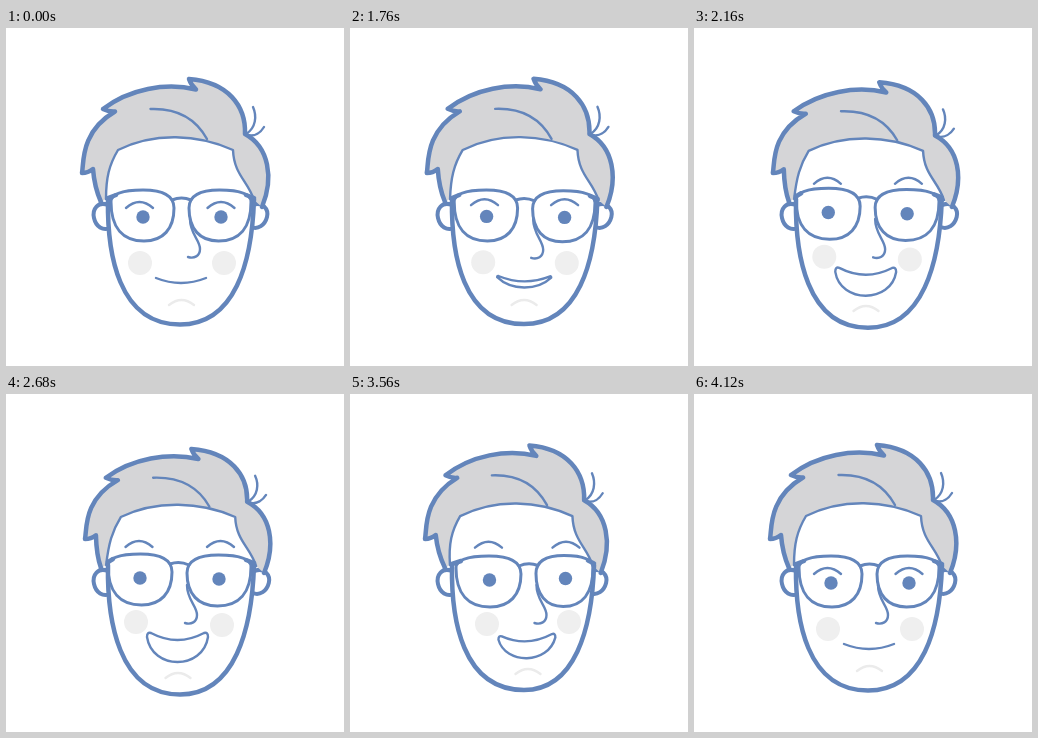
Animation of 338 by 338 pixels, one loop 5320 ms. Source, as an HTML page:

```html
<!DOCTYPE html>
<html lang="en">
<head>
<meta charset="utf-8">
<title>Smiling face</title>
<style>
  html, body { margin: 0; width: 100%; height: 100%; overflow: hidden; background: #fff; }
  svg { display: block; width: 100%; height: 100%; }
  path { fill: none; stroke: #6385bb; stroke-width: 2.4; stroke-linecap: round; stroke-linejoin: round; }
  .bold { stroke-width: 4.5; }
  .ear { stroke-width: 4; fill: #fff; }
  .skin { stroke: none; fill: #fff; }
  .mass { stroke: none; fill: #d5d5d7; }
  .soft { stroke: #ebebeb; }
  .lens { stroke-width: 3; }
  .temple { stroke-width: 4.5; }
  .eye { fill: #6385bb; }
  .cheek { fill: #efefef; }
</style>
</head>
<body>
<svg viewBox="0 0 338 338">
  <path id="earL" class="ear"/><path id="earR" class="ear"/>
  <path id="skin" class="skin"/>
  <circle id="cheekL" class="cheek" r="12"/><circle id="cheekR" class="cheek" r="12"/>
  <path id="mass" class="mass"/>
  <path id="jaw" class="bold"/>
  <path id="fringe"/><path id="swoop"/>
  <path id="crown" class="bold"/>
  <path id="tuft"/>
  <path id="chin" class="soft"/>
  <path id="browL"/><path id="browR"/>
  <circle id="eyeL" class="eye" r="6.7"/><circle id="eyeR" class="eye" r="6.7"/>
  <path id="nose"/><path id="mouth"/>
  <path id="lensL" class="lens"/><path id="lensR" class="lens"/>
  <path id="bridge" class="lens"/><path id="temples" class="temple"/>
</svg>
<script>
const LOOP = 5320, STEP = 40;

// hair: left, right, top; face: right, chin; lens: left, right, top
// brow: left x, right x, top; mouth: left xy, right xy, lip, bottom
const calm = {
  hair: [76, 264, 51], face: [247, 296.5], lensL: [105, 168, 162], lensR: [183, 245, 162],
  eyes: [137, 189, 215, 189], brow: [133.5, 215, 174], nose: [0, 0],
  mouth: [150, 250, 200, 250, 255, 255], cheeks: [134, 235, 218, 235], chin: [175.5, 272]
};
const rise = {
  hair: [78, 265, 50.5], face: [245.5, 295.5], lensL: [103, 167, 162], lensR: [182, 245, 164],
  eyes: [136, 187.5, 214, 190], brow: [136, 214, 167], nose: [-2, 2],
  mouth: [143, 245, 203, 246, 251, 266], cheeks: [132, 233, 215, 235], chin: [172, 272]
};
const grin = {
  hair: [79, 266, 55], face: [247, 300.5], lensL: [102, 166, 160], lensR: [181, 245, 161],
  eyes: [134, 184, 213, 185], brow: [133, 214.5, 147], nose: [-3, 0],
  mouth: [141, 239, 202, 239, 246, 268], cheeks: [130, 228, 216, 231], chin: [172, 279]
};
const turn = {
  hair: [75, 258.5, 51.5], face: [243, 296], lensL: [106, 171, 162], lensR: [186, 243, 161.5],
  eyes: [139.5, 186, 215.5, 184.5], brow: [138.5, 216, 147.5], nose: [2.5, 0],
  mouth: [148, 240, 207, 237, 245, 267], cheeks: [137, 230, 219, 228], chin: [178, 275]
};

const speedUp = p => p ** 1.5;
const slowDown = p => 1 - (1 - p) ** 2;
const inOut = n => p => p < .5 ? (2 * p) ** n / 2 : 1 - (2 - 2 * p) ** n / 2;

// start, end, from, to, easing, mouth easing
const moves = [
  [1520, 1960, calm, rise, speedUp],
  [1960, 2280, rise, grin, slowDown],
  [2680, 3160, grin, turn, inOut(4)],
  [3480, 4120, turn, calm, inOut(3), slowDown]
];

const $ = id => document.getElementById(id);
const draw = (id, d) => $(id).setAttribute('d', d);
const dot = (id, x, y) => { $(id).setAttribute('cx', x); $(id).setAttribute('cy', y); };
const warp = (d, fn) => d.replace(/([\d.]+) ([\d.]+)/g, (_, x, y) => fn(+x, +y).join(' '));

const crown = 'M95 174 C91 165 88 154 87 141 Q82 145 76 145 C78 135 74 104 109 83.5 ' +
  'Q103 84 97 81 C123 61 160 54 190 61.5 Q185 57 183 51 C222 54 240 78 239 106 ' +
  'C263 119 268 150 256 179';
const fringe = 'M248 172 C242 153 228 147 227 122 C192 106 148 104 112 122 C103 137 100 150 100 171';
const swoop = 'M144.5 81 C171 80 190 91 201 111';
const tuft = 'M240 106 C250 100 251 88 247 79 M241 107 C249 109 255 104 258 99';
const lens = 'M0 12 C0 3 12 0 32 0 C52 0 63 5 63 18 C63 39 52 51 33 51 C12 51 0 38 0 12 Z';

function poseAt(t) {
  let pose = calm;
  for (const [start, end, from, to, ease, lipEase = ease] of moves) {
    if (t < start) break;
    const p = Math.min(1, (t - start) / (end - start));
    pose = {};
    for (const k in from) {
      const q = (k === 'mouth' ? lipEase : ease)(p);
      pose[k] = from[k].map((v, i) => v + (to[k][i] - v) * q);
    }
  }
  return pose;
}

function drawHair([l, r, top]) {
  const bend = (x, y) => {
    const w = Math.min(1, Math.max(0, (172 - y) / 24));
    const goal = l + (x - 76) * (r - l) / 188;
    const hold = x > 170 ? 1 : w;
    return [x + (goal - x) * hold, y < 146 ? y + (top - 51) * (146 - y) / 95 : y];
  };
  const outer = warp(crown, bend), inner = warp(fringe, bend);
  draw('crown', outer);
  draw('fringe', inner);
  draw('mass', outer + inner.replace('M', 'L') + 'Z');
  draw('swoop', warp(swoop, bend));
  draw('tuft', warp(tuft, bend));
}

function drawHead([r, b], [, hairR]) {
  const jaw = `M102 171 C101 225 112 ${b} 174 ${b} C${r - 18} ${b} ${r - 1} 235 ${r + 1} 171`;
  const e = (hairR - 264) * .9 - 1;
  draw('jaw', jaw);
  draw('skin', jaw + 'L230 110 L110 110 Z');
  draw('earL', 'M102 177 C92 173 86 181 88 190 C90 199 97 203 104 200');
  draw('earR', `M${248 + e} 177 C${257 + e} 173 ${264 + e} 181 ${262 + e} 189 C${260 + e} 197 ${253 + e} 202 ${246 + e} 199`);
}

function drawGlasses(a, b, [r]) {
  draw('lensL', warp(lens, (x, y) => [a[0] + x * (a[1] - a[0]) / 63, a[2] + y]));
  draw('lensR', warp(lens, (x, y) => [b[1] - x * (b[1] - b[0]) / 63, b[2] + y]));
  const y = (a[2] + b[2]) / 2;
  draw('bridge', `M${a[1] - 2} ${a[2] + 10} Q${(a[1] + b[0]) / 2} ${y + 6} ${b[0] + 2} ${b[2] + 10}`);
  draw('temples', `M102 ${a[2] + 8} L${a[0] + 5} ${a[2] + 5} M${r + 1} ${b[2] + 8} L${b[1] - 5} ${b[2] + 5}`);
}

function drawMouth([xl, yl, xr, yr, lip, low]) {
  const w = xr - xl, mid = (yl + yr) / 2, open = Math.min(1, (low - lip) / 20);
  const c = 4 * open, inset = w * (1 / 3 - .25 * open);
  const deep = (low - (mid + c) / 4) / .75;
  draw('mouth', `M${xl + c} ${yl} Q${(xl + xr) / 2} ${2 * lip - mid} ${xr - c} ${yr} ` +
    `Q${xr} ${yr - c / 3} ${xr} ${yr + c} ` +
    `C${xr - inset} ${deep} ${xl + inset} ${deep} ${xl} ${yl + c} Q${xl} ${yl - c / 3} ${xl + c} ${yl} Z`);
}

const arc = (id, x, top, half, drop) =>
  draw(id, `M${x - half} ${top + drop} Q${x} ${top - drop} ${x + half} ${top + drop}`);

function render(t) {
  const p = poseAt(t);
  drawHair(p.hair);
  drawHead(p.face, p.hair);
  drawGlasses(p.lensL, p.lensR, p.face);
  drawMouth(p.mouth);
  const [x1, y1, x2, y2] = p.eyes, [c1, d1, c2, d2] = p.cheeks;
  dot('eyeL', x1, y1);
  dot('eyeR', x2, y2);
  dot('cheekL', c1, d1);
  dot('cheekR', c2, d2);
  arc('browL', p.brow[0], p.brow[2], 13.5, 6);
  arc('browR', p.brow[1], p.brow[2], 13.5, 6);
  arc('chin', p.chin[0], p.chin[1], 12.5, 5);
  const [n, m] = p.nose;
  draw('nose', `M${184 + n} 191 C${184 + n} 206 ${194 + n} ${212 + m} ${194 + n} ${221 + m} ` +
    `C${194 + n} ${228 + m} ${188 + n} ${231 + m} ${182 + n} ${229 + m}`);
}

const began = performance.now();
function tick() {
  const t = (performance.now() - began) % LOOP;
  render(Math.floor(t / STEP) * STEP);
  requestAnimationFrame(tick);
}
tick();
</script>
</body>
</html>
```
